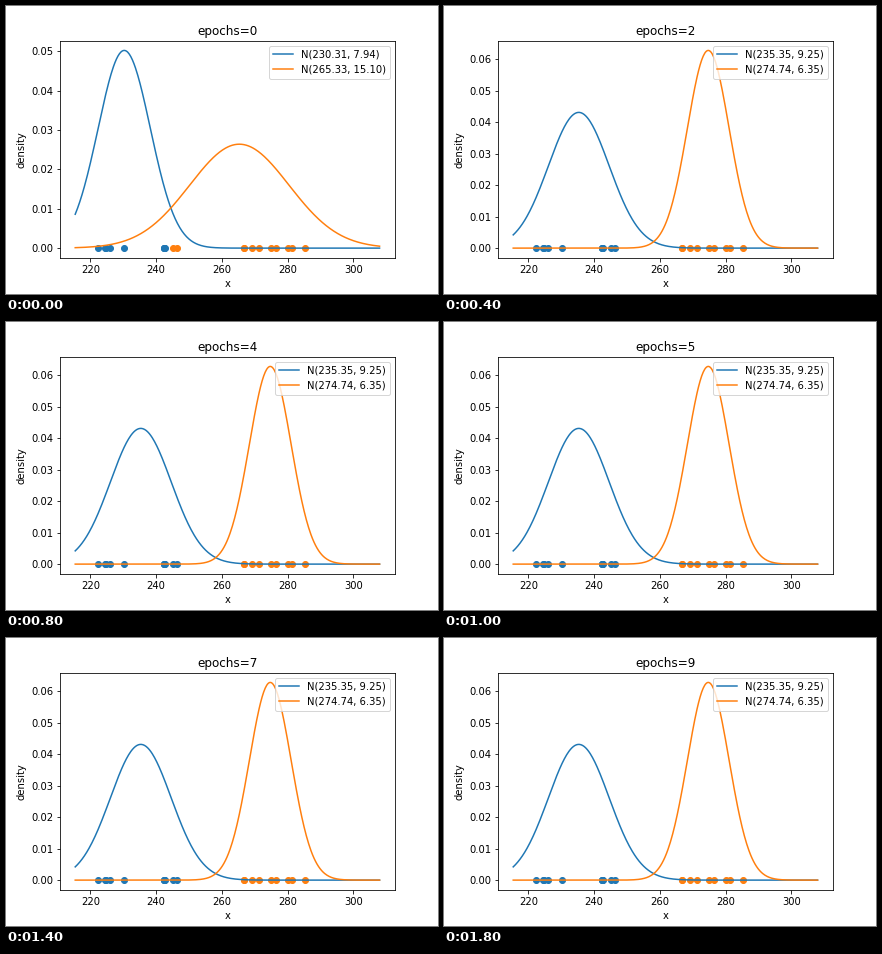
A matplotlib script for the animation above (2 s loop, 432 by 288 pixels).

```python
import numpy as np
import matplotlib.pyplot as plt
from matplotlib.animation import FuncAnimation

EPOCHS = 10
STEP_MS = 200
FIRST_SPLIT = 7  # the lowest samples start out in cluster 0

SAMPLES = np.array([
    222.30, 224.38, 224.70, 225.90, 230.17, 242.37, 242.37, 242.44, 242.64, 245.10,
    246.45, 266.70, 266.70, 269.19, 271.41, 275.05, 276.57, 280.23, 281.43, 285.38,
])
GRID = np.linspace(215.4, 308.0, 400)


def normal_pdf(x, mean, dev):
    return np.exp(-0.5 * ((x - mean) / dev) ** 2) / (dev * np.sqrt(2 * np.pi))


def fit_clusters(owner):
    groups = [SAMPLES[owner == k] for k in (0, 1)]
    return [(group.mean(), group.std()) for group in groups]


def assign(fits):
    return np.argmax([normal_pdf(SAMPLES, *fit) for fit in fits], axis=0)


def run_em(epoch):
    """Alternate fitting and hard assignment up to the given epoch."""
    owner = (np.arange(len(SAMPLES)) >= FIRST_SPLIT).astype(int)
    for _ in range(epoch + 1):
        fits = fit_clusters(owner)
        owner = assign(fits)
    return fits, owner


fig, ax = plt.subplots(figsize=(6, 4), dpi=72, facecolor="white")
fig.subplots_adjust(left=0.125, right=0.9, bottom=0.125, top=0.88)


def draw(epoch):
    ax.clear()
    fits, owner = run_em(epoch)
    for k, (mean, dev) in enumerate(fits):
        members = SAMPLES[owner == k]
        ax.scatter(members, np.zeros_like(members), color=f"C{k}")
        ax.plot(GRID, normal_pdf(GRID, mean, dev), color=f"C{k}",
                label=f"N({mean:.2f}, {dev:.2f})")

    ax.set(title=f"epochs={epoch}", xlabel="x", ylabel="density")
    ax.legend(loc="upper right")
    return ax.get_children()


anim = FuncAnimation(fig, draw, frames=EPOCHS, interval=STEP_MS,
                     init_func=lambda: draw(0), repeat=True, repeat_delay=0)
plt.show()
```
